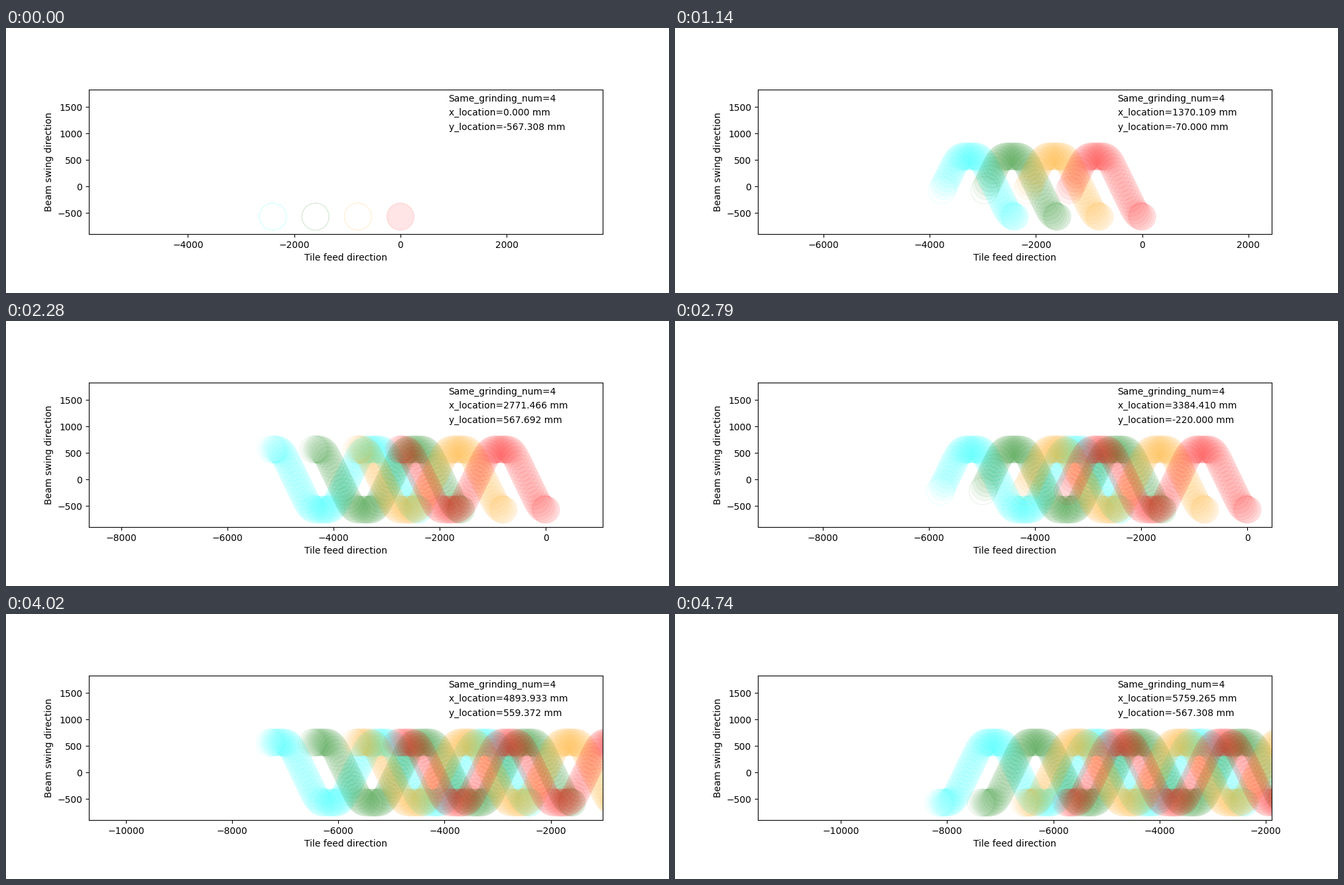
Recreate the animation shown at these times as a matplotlib script. Size 1000 px wide and 400 px high, loop 4.77 s.

```python
import numpy as np
import matplotlib.pyplot as plt
from matplotlib.animation import FuncAnimation
from matplotlib.collections import EllipseCollection
from matplotlib.colors import to_rgba

# Motion of the grinding beam (mm, s)
FEED_SPEED = 240.37
SWING_SPEED, SWING_ACCEL = 500, 650
RAMP, CRUISE, DWELL = 0.77, 1.5, 1.0
HALF_CYCLE = 2 * RAMP + CRUISE + DWELL
CYCLE = 2 * HALF_CYCLE
STEP = 0.15
STEPS_PER_CYCLE = int(CYCLE / STEP)
FRAMES = 3 * STEPS_PER_CYCLE
Y_START = -(SWING_SPEED * CRUISE + SWING_SPEED**2 / SWING_ACCEL) / 2

# Grinding heads
RADIUS = 255
SPACING = 800
COLORS = ["red", "orange", "green", "cyan"]
ALPHA = 0.05

X_LIMITS = np.array([-5866, 3809])
Y_LIMITS = (-895, 1826)


def swing(t):
    """Distance covered by one stroke: ramp up, cruise, ramp down, dwell."""
    up = np.clip(t, 0, RAMP)
    cruise = np.clip(t - RAMP, 0, CRUISE)
    down = np.clip(t - RAMP - CRUISE, 0, RAMP)
    return (SWING_SPEED * (cruise + down)
            + SWING_ACCEL / 2 * (up**2 - down**2))


def location(step):
    cycle, k = np.divmod(step, STEPS_PER_CYCLE)
    t = k * STEP
    x = FEED_SPEED * (cycle * CYCLE + t) - 1e-6
    y = Y_START + swing(t) - swing(t - HALF_CYCLE)
    return x, y


# The starting position is stamped twice.
steps = np.r_[0, np.arange(FRAMES)]
feed, beam = location(steps)
heads = np.arange(len(COLORS))
centers = np.stack([-feed[:, None] - SPACING * heads,
                    np.repeat(beam[:, None], len(heads), axis=1)], axis=-1)
palette = np.array([to_rgba(c, ALPHA) for c in COLORS])

fig, ax = plt.subplots(figsize=(10, 4), dpi=100)
ax.set_aspect("equal")
ax.set_ylim(*Y_LIMITS)
ax.set_xlabel("Tile feed direction")
ax.set_ylabel("Beam swing direction")

discs = EllipseCollection([2 * RADIUS], [2 * RADIUS], [0], units="xy",
                          offsets=centers[0], offset_transform=ax.transData,
                          linewidths=1)
ax.add_collection(discs, autolim=False)

ax.text(0.7, 0.92, f"Same_grinding_num={len(COLORS)}", transform=ax.transAxes)
x_text = ax.text(0.7, 0.82, "", transform=ax.transAxes)
y_text = ax.text(0.7, 0.72, "", transform=ax.transAxes)


def update(frame):
    count = frame + 2
    edges = np.tile(palette, (count, 1, 1))
    faces = edges.copy()
    # Trailing heads show only an outline at their newest position.
    newest = steps[:count] == frame
    faces[newest, 1:, 3] = 0
    edges[newest, 1:, 3] = 0.08
    discs.set_offsets(centers[:count].reshape(-1, 2))
    discs.set_facecolor(faces.reshape(-1, 4))
    discs.set_edgecolor(edges.reshape(-1, 4))

    ax.set_xlim(*(X_LIMITS - FEED_SPEED * STEP * frame))
    x, y = location(frame)
    x_text.set_text(f"x_location={abs(x):.3f} mm")
    y_text.set_text(f"y_location={y:.3f} mm")
    return discs, x_text, y_text


anim = FuncAnimation(fig, update, frames=FRAMES, init_func=lambda: update(0),
                     interval=30, repeat=True, repeat_delay=0, blit=False)
plt.show()
```
